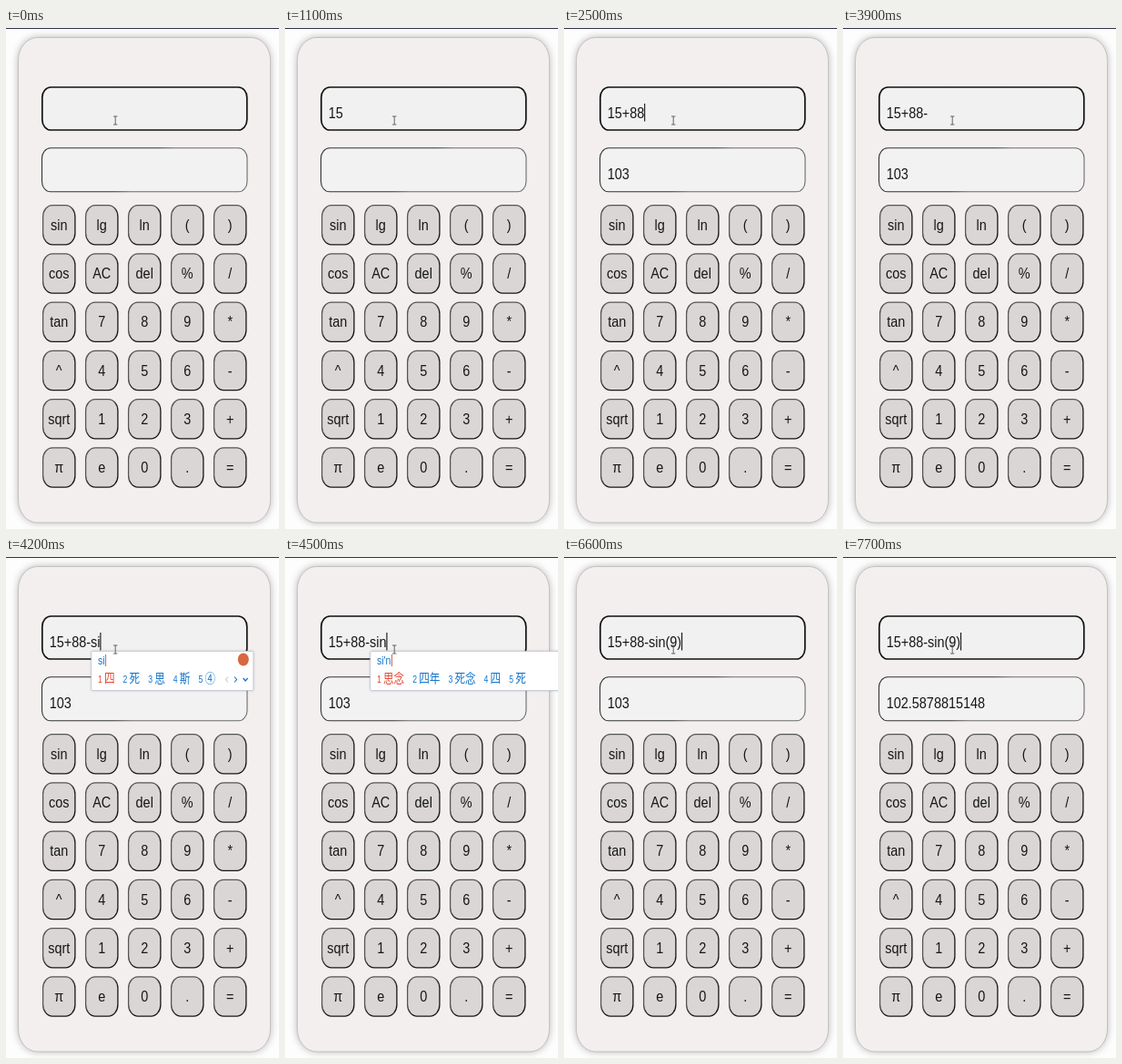
Recreate the animation shown at these times as an HTML page with a canvas. Size 300 by 550 pixels, loop 8000 ms.

```html
<!DOCTYPE html>
<html lang="en">
<head>
<meta charset="utf-8">
<title>Calculator</title>
<style>
html, body { margin: 0; height: 100%; overflow: hidden; background: #fdfdfd; }
canvas { display: block; }
</style>
</head>
<body>
<canvas id="stage" width="300" height="550"></canvas>
<script>
const ctx = document.getElementById('stage').getContext('2d');
const LOOP = 8000;
const TALL = 1.19; // the whole screen is taller than its natural proportions
const SANS = '"Liberation Sans", Arial, sans-serif';
const CJK = '"Noto Sans CJK SC", "Noto Sans CJK", sans-serif';
const BLUE = '#1273c8', RED = '#e2452f';

const KEYS = [
  'sin lg ln ( )', 'cos AC del % /', 'tan 7 8 9 *',
  '^ 4 5 6 -', 'sqrt 1 2 3 +', 'π e 0 . ='
].map(row => row.split(' '));

// time, typed text, caret visible
const TYPING = [
  [0, '', 0], [100, '', 1], [400, '1', 1], [600, '15', 1], [1100, '15', 0],
  [1400, '15+', 1], [2000, '15+', 0], [2100, '15+8', 1], [2200, '15+88', 1],
  [2700, '15+88', 0], [3200, '15+88', 1], [3300, '15+88-', 1], [3900, '15+88-', 0],
  [4100, '15+88-s', 1], [4200, '15+88-si', 1], [4400, '15+88-sin', 1],
  [5100, '15+88-sin(*', 1], [5600, '15+88-sin(', 1], [6000, '15+88-sin(9', 1],
  [6500, '15+88-sin(9', 0], [6600, '15+88-sin(9)', 1], [7100, '15+88-sin(9)', 0],
  [7700, '15+88-sin(9)', 1]
];
const RESULTS = [[0, ''], [2500, '103'], [7100, '102.5878815148']];
// time, letters, candidates, popup width
const POPUPS = [
  [0], [4100, 's', '是 说 上 时 使', 178], [4200, 'si', '四 死 思 斯 ④', 178],
  [4400, "si'n", '思念 四年 死念 四 死', 240], [4700]
];

const at = (list, t) => list.findLast(item => item[0] <= t);

function text(str, x, y, size = 14.45, color = '#161616', font = SANS, align = 'left') {
  ctx.save();
  ctx.translate(x, y);
  ctx.scale(1, TALL);
  ctx.font = size + 'px ' + font;
  ctx.textAlign = align;
  ctx.fillStyle = color;
  ctx.fillText(str, 0, 0);
  const width = ctx.measureText(str).width;
  ctx.restore();
  return width;
}

function box(x, y, w, h, r, fill, from, to = from, line = 1.2) {
  const edge = ctx.createLinearGradient(x + w / 2 - h / 2, y, x + w / 2 + h / 2, y + h);
  edge.addColorStop(0.4, from);
  edge.addColorStop(0.6, to);
  ctx.beginPath();
  ctx.roundRect(x, y, w, h, { x: r, y: r * TALL });
  ctx.fillStyle = fill;
  ctx.fill();
  ctx.shadowColor = 'transparent';
  ctx.strokeStyle = edge;
  ctx.lineWidth = line;
  ctx.stroke();
}

function shadow(blur, color) {
  ctx.shadowBlur = blur;
  ctx.shadowColor = color;
}

function stroke(points, color, width = 1) {
  ctx.beginPath();
  points.forEach(([x, y]) => ctx.lineTo(x, y));
  ctx.strokeStyle = color;
  ctx.lineWidth = width;
  ctx.stroke();
}

function drawBody() {
  ctx.fillStyle = '#fdfdfd';
  ctx.fillRect(0, 0, 300, 550);
  ctx.fillStyle = '#31344a';
  ctx.fillRect(0, 0, 300, 1);
  shadow(8, 'rgba(0,0,0,.3)');
  box(13.5, 10.5, 277, 532.5, 21, '#f3efef', '#c4c0c0', '#c4c0c0', 1);
  box(39.8, 65, 225, 47, 9.5, '#f2f1f2', '#111', '#111', 1.7);
  box(39.5, 131.8, 225.5, 48, 9.5, '#f3f2f3', '#333', '#6a6a6a', 1.1);
  KEYS.forEach((row, j) => row.forEach((label, i) => {
    const x = 40.6 + 47 * i, y = 194.6 + 53.25 * j;
    box(x, y, 35.3, 43.2, 10.5, '#dad6d6', '#555', '#161616', 1.3);
    text(label, x + 17.6, y + 27.2, 14.45, '#161616', SANS, 'center');
  }));
}

function drawPopup(letters, candidates, width) {
  shadow(3, 'rgba(0,0,0,.25)');
  box(93.8, 103.5, width, 43, 1, '#fff', '#c3c7d2', '#c3c7d2', 0.8);
  const end = 101 + text(letters, 101, 117.5, 10.5, BLUE, SANS);
  stroke([[end + 1, 107], [end + 1, 120]], RED, 0.9);

  let x = 101;
  candidates.split(' ').forEach((word, i) => {
    text(i + 1, x, 137.5, 8.6, i ? BLUE : RED);
    x += 7 + text(word, x + 7, 138.3, 11.6, i ? BLUE : RED, CJK) + 9;
  });

  const right = 93.8 + width;
  ctx.beginPath();
  ctx.ellipse(right - 11, 112.5, 6, 7, 0, 0, 7);
  ctx.fillStyle = '#d9673f';
  ctx.fill();
  const chevron = (cx, dir, color) =>
    stroke([[cx - dir, 131.5], [cx + dir, 134.5], [cx - dir, 137.5]], color, 1.1);
  chevron(right - 29, -1.3, '#c5cad3');
  chevron(right - 19.5, 1.3, BLUE);
  stroke([[right - 11.2, 133], [right - 8.7, 136], [right - 6.2, 133]], BLUE, 1.2);
}

function drawPointer() {
  const color = '#555';
  stroke([[118, 97], [122.4, 97]], color, 0.9);
  stroke([[120.2, 97], [120.2, 106]], color, 0.9);
  stroke([[118, 106], [122.4, 106]], color, 0.9);
}

function frame(now) {
  const t = now % LOOP;
  drawBody();
  const [, typed, caret] = at(TYPING, t);
  const end = 47.7 + text(typed, 47.7, 98.8);
  if (caret) stroke([[end + 0.4, 83], [end + 0.4, 102.5]], '#111', 1.1);
  text(at(RESULTS, t)[1], 47.7, 166.2);
  const [, letters, candidates, width] = at(POPUPS, t);
  if (letters) drawPopup(letters, candidates, width);
  drawPointer();
  requestAnimationFrame(frame);
}
requestAnimationFrame(frame);
</script>
</body>
</html>
```
